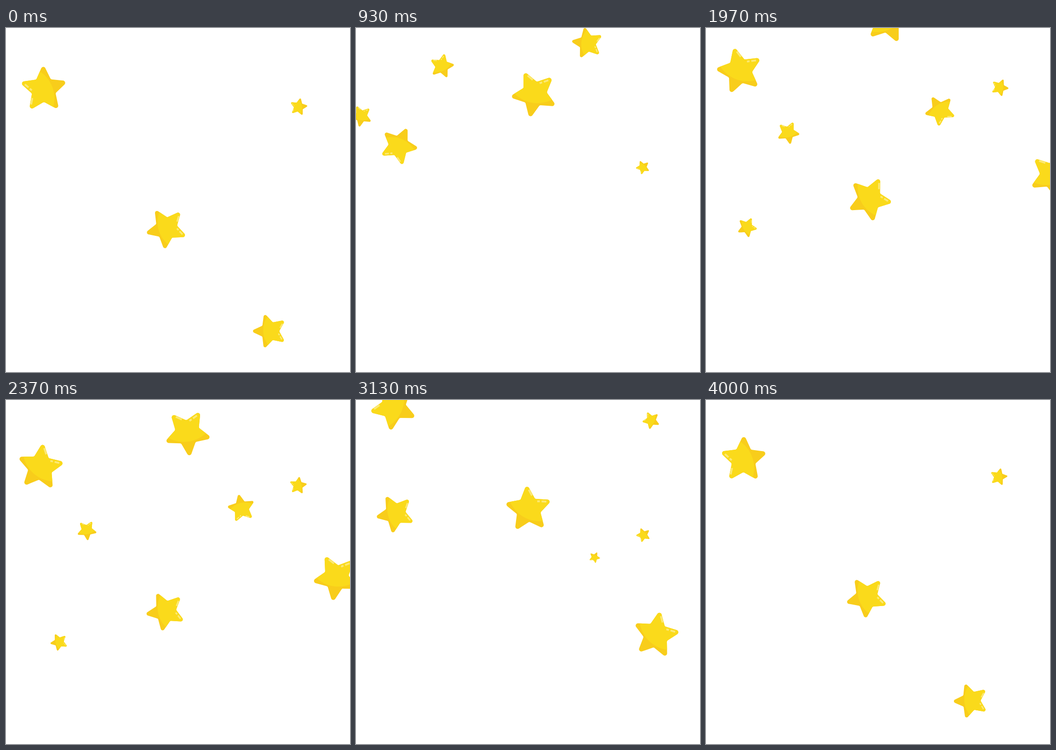
An HTML page with a canvas for the animation above (4030 ms loop, 748x748 px).

```html
<!DOCTYPE html>
<html lang="en">
<head>
<meta charset="utf-8">
<title>Falling stars</title>
<style>
html, body { margin: 0; width: 100%; height: 100%; overflow: hidden; background: #fff; }
canvas { display: block; width: 100vw; height: 100vh; }
</style>
</head>
<body>
<canvas id="stage" width="748" height="748"></canvas>
<script>
const SIZE = 748, LOOP = 4.03, FRAMES = 121;
const SHRINK = 1.28;  // seconds a star takes to dwindle
const SPIN = 49.3;    // usual turn in degrees per second
const BODY = '#fada1b', SHADE = '#f8cd1b', SHINE = '#fce974';
const ctx = document.getElementById('stage').getContext('2d');

// A star falls at a steady speed and vanishes at (x, y); sway holds the
// sideways speed there and its higher terms. Times are the vanishing moments.
const stars = [
  { x: 105, y: 331, fall: 131.5, sway: [24.8, 6.3], angle: -93, spin: -SPIN, times: [1.5] },
  { x: 102, y: 328, fall: 132.5, sway: [32.6, 9.2], angle: 200, times: [3.74] },
  { x: 149, y: 659, fall: 232.5, sway: [55.5, -6.4], angle: 200, scale: .465, times: [2.94] },
  { x: 519, y: 345, fall: 140.5, sway: [10, 1.3], angle: 297, scale: .68, times: [3.15] },
  { x: 351.6, y: 606.6, fall: 219.5, sway: [30.5, 41.3, 8.85], angle: 205, times: [.78, 3.04] },
  { x: 539, y: 725, fall: 164.5, sway: [-87], angle: 200, times: [.4] },
  { x: 614, y: 375, fall: 141.3, sway: [-21.3, -4], angle: -62, spin: -38.5, scale: .38, times: [1.44, 3.707] },
  { x: 171.4, y: 361.6, fall: 139.3, sway: [-7.7], angle: 92, spin: 13.2, scale: .53, times: [2.93] }
];

// Star outline with its shaded arm pointing along +x
function makeStar() {
  const path = new Path2D();
  const corner = i => {
    const r = i % 2 ? 27 : 56, a = i * Math.PI / 5;
    return [r * Math.cos(a), r * Math.sin(a)];
  };
  const [ax, ay] = corner(0), [bx, by] = corner(9);
  path.moveTo((ax + bx) / 2, (ay + by) / 2);
  for (let i = 0; i < 10; i++) path.arcTo(...corner(i), ...corner(i + 1), i % 2 ? 4 : 5);
  path.closePath();
  return path;
}

const outline = makeStar();
const glow = new Path2D();
glow.arc(-50.4, 3, 70, 0, Math.PI * 2);
const shine = new Path2D('M-36.5 22L-29.5 9.6M-25 -6.8L-28 -11.6M-29.8 -15L-35 -24');

function drawStar(x, y, angle, scale) {
  ctx.save();
  ctx.translate(x, y);
  ctx.rotate(angle * Math.PI / 180);
  ctx.scale(scale, scale);
  ctx.fillStyle = SHADE;
  ctx.fill(outline);
  ctx.save();
  ctx.clip(outline);
  ctx.fillStyle = BODY;
  ctx.fill(glow);
  ctx.restore();
  ctx.strokeStyle = SHINE;
  ctx.lineWidth = 4;
  ctx.stroke(shine);
  ctx.restore();
}

const polynomial = (terms, t) => terms.reduceRight((sum, k) => (sum + k) * t, 0);

function render(time) {
  ctx.fillStyle = '#fff';
  ctx.fillRect(0, 0, SIZE, SIZE);
  for (const { x, y, fall, sway, angle, spin = SPIN, scale = 1, times } of stars) {
    for (const end of times) {
      const left = (end - time + LOOP) % LOOP;
      const size = scale * Math.min(1, left / SHRINK) ** .25;
      drawStar(x + polynomial(sway, -left), y - fall * left, angle - spin * left, size);
    }
  }
}

const began = performance.now();
function tick() {
  const t = (performance.now() - began) / 1000 % LOOP;
  const frame = Math.floor((t + .005) / LOOP * FRAMES) % FRAMES;
  render(Math.round(frame / .3) / 100);
  requestAnimationFrame(tick);
}
tick();
</script>
</body>
</html>
```
